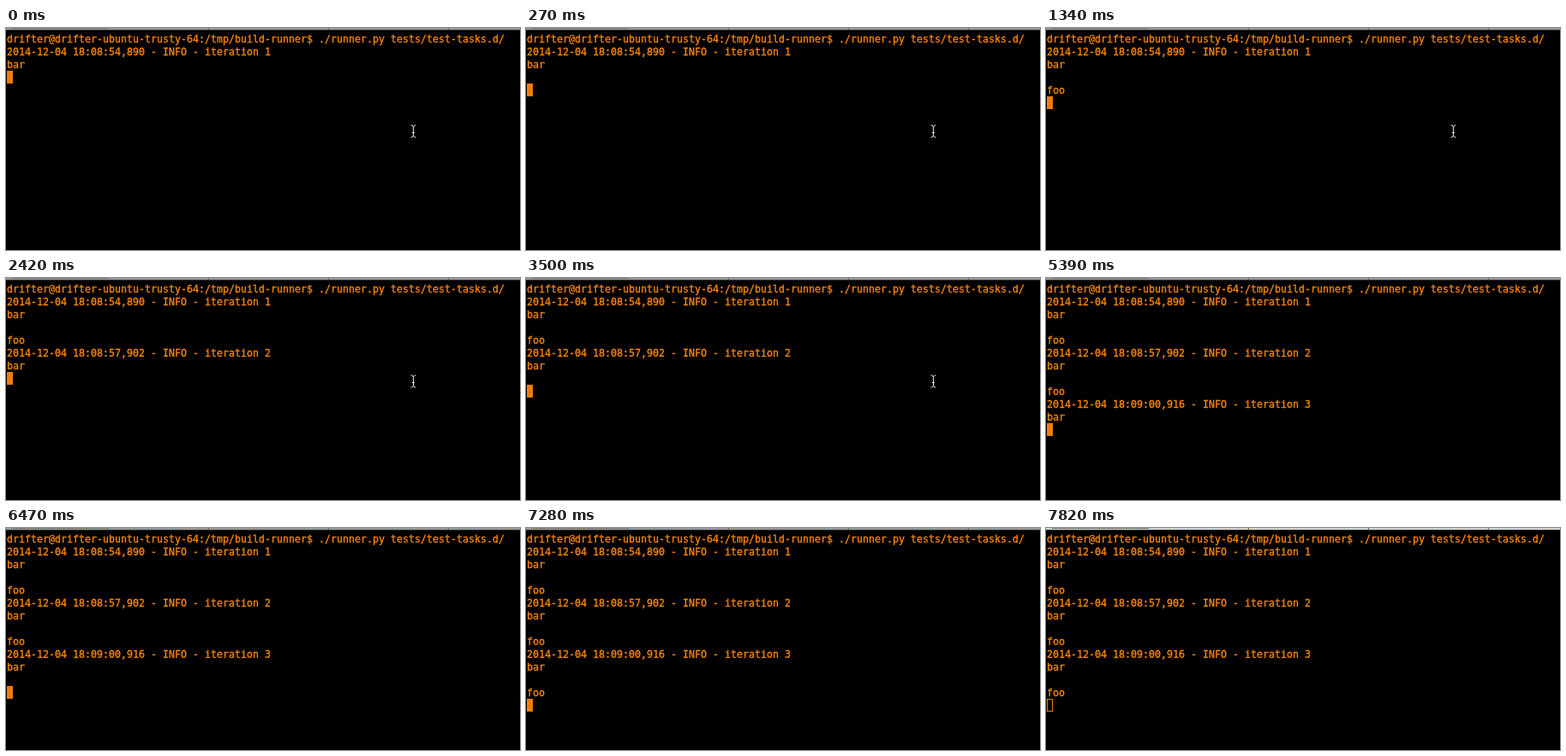
These frames come from a looping animation (600 by 260 pixels, 7.84 s). An HTML page:

```html
<!DOCTYPE html>
<html lang="en">
<head>
<meta charset="utf-8">
<title>Task runner</title>
<style>
  :root { --ink: #f88400; --block: #ee7e08; --loop: 7840ms step-end infinite; }
  html, body { margin: 0; width: 100%; height: 100%; overflow: hidden; background: #000; }
  .stage { position: relative; width: 600px; height: 260px; overflow: hidden; background: #000; }
  .stage > * { position: absolute; }

  pre {
    left: 1px; top: 6px; margin: 0;
    font: 11.63px/15px "DejaVu Sans Mono", monospace;
    color: var(--ink);
    -webkit-text-stroke: .35px var(--ink);
  }

  /* Hides the rows still to be printed and carries the cursor */
  .rest {
    left: 0; top: 5px; width: 600px; height: 260px;
    background: #000;
    animation: print var(--loop);
  }
  .cursor {
    position: absolute; left: 1px; top: 0;
    box-sizing: border-box; width: 7px; height: 15px;
    border: 1px solid var(--block);
    background: var(--block);
    animation: hollow var(--loop);
  }
  @keyframes print {
    0%        { transform: translateY(45px); }
    3.44388%  { transform: translateY(60px); }
    17.09184% { transform: translateY(75px); }
    30.86735% { transform: translateY(105px); }
    44.64286% { transform: translateY(120px); }
    54.97449% { transform: translateY(135px); }
    68.75%    { transform: translateY(165px); }
    82.52551% { transform: translateY(180px); }
    92.85714%, 100% { transform: translateY(195px); }
  }
  @keyframes hollow {
    99.7449%, 100% { background: #000; }
  }

  .mouse { left: 472px; top: 113px; animation: mouse var(--loop); }
  @keyframes mouse {
    0%        { transform: none; visibility: visible; }
    48.08673% { transform: translate(116px, 83px); visibility: visible; }
    51.53061%, 100% { transform: translate(116px, 83px); visibility: hidden; }
  }

  .tabs {
    left: 0; top: 0; width: 600px; height: 2px;
    background: #999;
    border-bottom: 1px solid #303030;
    animation: blur var(--loop);
  }
  .tabs i { position: absolute; top: 0; width: 1px; height: 2px; background: #6a6a6a; }
  .tabs .active { left: 7px; width: 113px; height: 1px; background: #7c7c74; }
  @keyframes blur {
    99.7449%, 100% { background: #d2d2d2; }
  }
</style>
</head>
<body>
<div class="stage">
<pre>drifter@drifter-ubuntu-trusty-64:/tmp/build-runner$ ./runner.py tests/test-tasks.d/
2014-12-04 18:08:54,890 - INFO - iteration 1
bar

foo
2014-12-04 18:08:57,902 - INFO - iteration 2
bar

foo
2014-12-04 18:09:00,916 - INFO - iteration 3
bar

foo</pre>
  <div class="rest"><div class="cursor"></div></div>
  <div class="tabs">
    <i class="active"></i>
    <i style="left:236px"></i><i style="left:376px"></i><i style="left:516px"></i>
  </div>
  <svg class="mouse" width="8" height="16" fill="none" stroke="#e4e4e4">
    <path d="M.5 .8Q3.5 .8 3.5 3.5Q3.5 .8 6.5 .8M3.5 3V13M.5 15.2Q3.5 15.2 3.5 12.5Q3.5 15.2 6.5 15.2M2 9.5H5"/>
  </svg>
</div>
</body>
</html>
```
